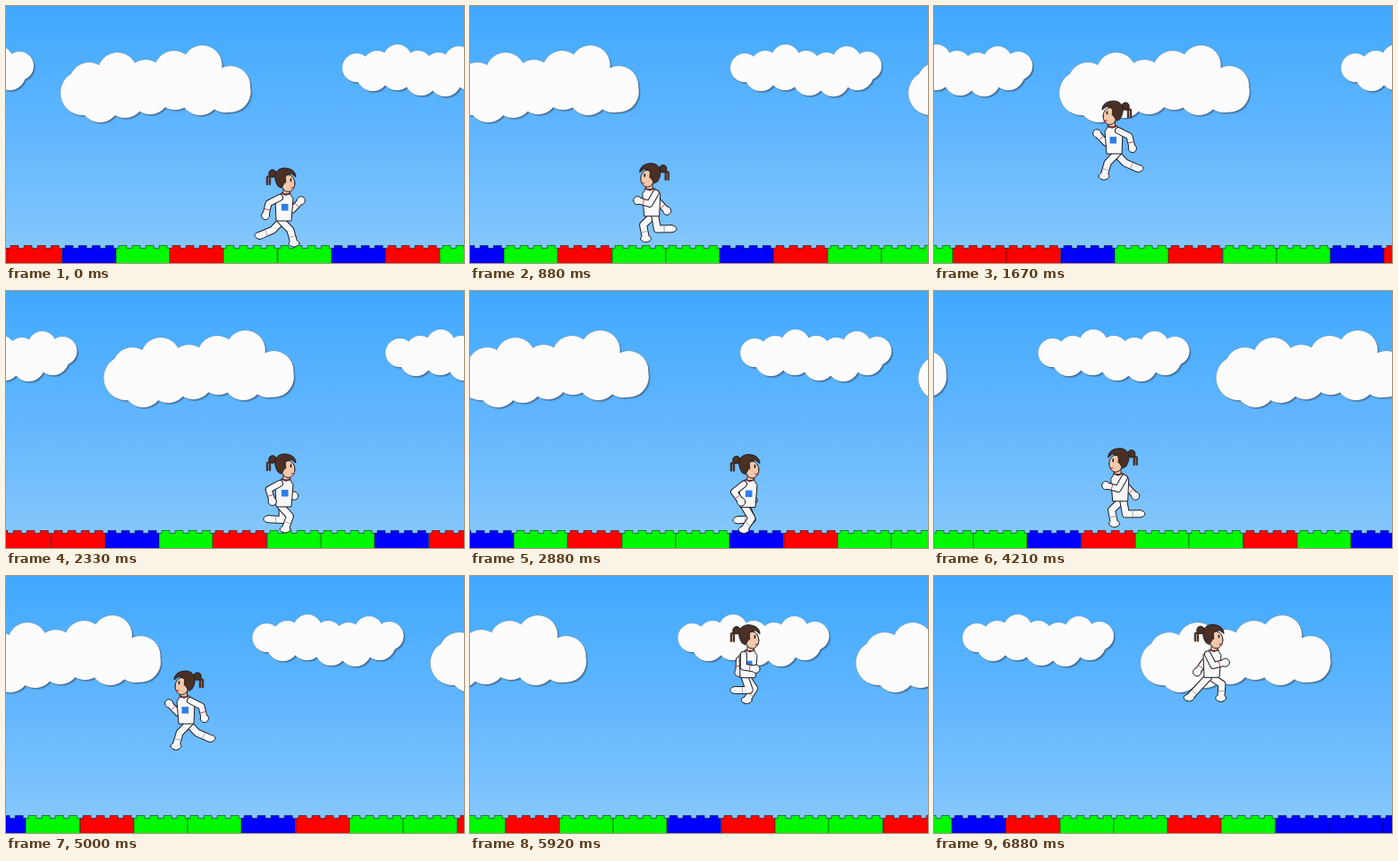
These frames come from a looping animation (512x287 px, 6.93 s). An HTML page with a canvas:

```html
<!DOCTYPE html>
<html lang="en">
<head>
<meta charset="utf-8">
<title>Runner</title>
<style>
html, body { margin: 0; width: 100%; height: 100%; overflow: hidden; background: #6cbaff; }
canvas { display: block; width: 512px; height: 287px; }
</style>
</head>
<body>
<canvas id="stage" width="512" height="287"></canvas>
<script>
const ctx = document.getElementById('stage').getContext('2d');
const W = 512, H = 287, LOOP = 6930, STEP = 1000 / 24, LAST = 165;
const INK = '#1d1d22', WHITE = '#f8f8fa', HAIR = '#4b3026', SKIN = '#f3c8ab', RED = '#c8323c';
const { sin, cos, hypot, min, max, round, PI } = Math;

// Times and speeds are in steps of 1/24 s.
const SPEED = 8.72, LEFT_STOP = 206, RIGHT_STOP = 306;
const TURNS = [9.73, 40, 90.3, 122.8];
const JUMP_PEAKS = [32.26, 112.26, 145, 168], JUMP_HALF = 11.5, JUMP_HEIGHT = 137;
const GROUND = 271, CYCLE = 40 / 3;

// The runner crosses the screen between two stops; past a stop the world scrolls instead.
function track(n) {
  let x = RIGHT_STOP, scroll = 0, dir = 1, from = 0;
  for (const turn of [...TURNS, Infinity]) {
    const end = min(turn, n);
    const goal = x + dir * SPEED * (end - from);
    x = min(RIGHT_STOP, max(LEFT_STOP, goal));
    scroll += x - goal;
    if (n <= turn) break;
    from = end;
    dir = -dir;
  }
  return { x, scroll, dir };
}

function jumpHeight(n) {
  return max(0, ...JUMP_PEAKS.map(p => JUMP_HEIGHT * (1 - ((n - p) / JUMP_HALF) ** 2)));
}

// Evenly spaced round puffs whose outer edges touch the given heights.
function row(path, x0, x1, edges, r, side) {
  edges.forEach((edge, i) => {
    puff(path, x0 + (x1 - x0) * i / (edges.length - 1), edge + side * r, r);
  });
}

function puff(path, x, y, r) {
  path.moveTo(x + r, y);
  path.arc(x, y, r, 0, PI * 2);
}

const CLOUD_GAP = 514;
const big = new Path2D(), small = new Path2D();
row(big, 93, 251, [63, 52, 60, 50, 44, 67], 22, 1);
row(big, 105, 245, [130, 125, 121, 116, 122, 119], 22, -1);
puff(big, 86, 97, 25);
puff(big, 251, 96, 22.5);
row(small, 392, 529, [53, 50, 43, 50, 52, 45, 51], 16, 1);
row(small, 410, 518, [95, 94, 100, 101, 94], 18, -1);

function cloud(path, x) {
  ctx.save();
  ctx.translate(x + 2, 2);
  for (const shade of ['rgba(35,55,85,.25)', 'rgba(35,50,75,.5)']) {
    ctx.fillStyle = shade;
    ctx.fill(path);
    ctx.translate(-1, -1);
  }
  ctx.strokeStyle = '#8097ac';
  ctx.lineWidth = 1;
  ctx.stroke(path);
  ctx.fillStyle = '#fcfcfc';
  ctx.fill(path);
  ctx.restore();
}

const BRICKS = 'GRRBGRGGBRGGRGBBB', BRICK = 60.3, FIRST = 62.5 - 3 * BRICK;
const PAINT = { R: '#fe0000', G: '#00f800', B: '#0000fe' };

function brick(x, color) {
  const gap = BRICK / 4;
  ctx.beginPath();
  ctx.moveTo(x, H + 2);
  for (let s = 0; s < 4; s++) {
    const left = x + s * gap + 3;
    ctx.lineTo(s ? left : x, 270.5);
    ctx.lineTo(left, 270.5);
    ctx.lineTo(left, 267.5);
    ctx.lineTo(left + 9, 267.5);
    ctx.lineTo(left + 9, 270.5);
  }
  ctx.lineTo(x + BRICK, 270.5);
  ctx.lineTo(x + BRICK, H + 2);
  paint(color, 'rgba(0,0,0,.45)');
}

function paint(fill, line = INK) {
  ctx.fillStyle = fill;
  ctx.fill();
  ctx.strokeStyle = line;
  ctx.lineWidth = 1;
  ctx.stroke();
}

function shape(points, fill) {
  ctx.beginPath();
  points.forEach(([x, y]) => ctx.lineTo(x, y));
  ctx.closePath();
  paint(fill);
}

function oval(x, y, rx, ry, fill) {
  ctx.beginPath();
  ctx.ellipse(x, y, rx, ry, 0, 0, PI * 2);
  paint(fill);
}

function stroke(points, color, width) {
  ctx.beginPath();
  points.forEach(([x, y]) => ctx.lineTo(x, y));
  ctx.strokeStyle = color;
  ctx.lineWidth = width;
  ctx.stroke();
}

// Middle joint of a limb with two equal bones; side 1 bends forward, -1 back.
function bend([ax, ay], [bx, by], bone, side) {
  const dx = bx - ax, dy = by - ay, d = hypot(dx, dy);
  const out = side * Math.sqrt(max(0, bone ** 2 - d * d / 4)) / d;
  return [(ax + bx) / 2 + dy * out, (ay + by) / 2 - dx * out];
}

function limb(root, end, bone, side, width, rx, ry, cuff) {
  const mid = bend(root, end, bone, side);
  stroke([root, mid, end], INK, width + 2);
  oval(end[0], end[1], rx, ry, WHITE);
  stroke([root, mid, end], WHITE, width);
  const [x, y] = [(mid[0] + end[0]) / 2, (mid[1] + end[1]) / 2];
  const d = hypot(end[0] - mid[0], end[1] - mid[1]);
  const nx = (mid[1] - end[1]) / d * 3, ny = (end[0] - mid[0]) / d * 3;
  stroke([[x - nx, y - ny], [x + nx, y + ny]], cuff, .9);
}

function handAt(a) {
  const swing = cos(a + .13);
  return [4 - 20 * swing, -35 - 17 * max(0, -swing) ** 2];
}

function footAt(a) {
  return [-3 + 20 * cos(a + .31), -4 - 9 * max(0, .25 + cos(a - 3.9))];
}

const arm = (shoulder, hand) => limb(shoulder, hand, 14, -1, 6, 4.6, 4.6, RED);
const leg = (hip, foot) => limb(hip, foot, 15.5, 1, 7, 6, 3.8, '#9a9aa2');

function head() {
  for (const x of [-14, -11]) stroke([[-8, -81], [x, -78], [x, -70]], HAIR, 2.4);
  oval(-8, -82, 4.2, 4.2, HAIR);
  shape([[4, -66], [11, -66], [11, -59], [4, -59]], SKIN);
  oval(9.5, -71, 7.5, 9.5, SKIN);
  ctx.beginPath();
  ctx.moveTo(-2, -68);
  ctx.bezierCurveTo(-9, -79, -4, -88, 5, -88);
  ctx.bezierCurveTo(13, -88, 18, -84, 18, -78);
  ctx.lineTo(13, -82);
  ctx.lineTo(7, -80);
  ctx.lineTo(5, -71);
  ctx.lineTo(2, -66);
  ctx.closePath();
  paint(HAIR);
  stroke([[6, -81], [6.5, -72]], HAIR, 1.5);
  stroke([[12.5, -76], [12.5, -73.5]], INK, 1.6);
  stroke([[13, -66], [16, -66.5]], RED, 1.2);
}

function runner(angle) {
  const hand = handAt(angle);
  arm([8, -54], handAt(angle + PI));
  leg([3, -30], footAt(angle + PI));
  leg([1, -30], footAt(angle));
  shape([[2, -60], [11, -60], [15, -54], [13, -29], [-4, -29], [-5, -54]], WHITE);
  head();
  stroke([[2, -60], [7, -58], [12, -60]], '#6b2c2c', 1.5);
  if (hand[0] < 16) {
    ctx.fillStyle = '#2f7de6';
    ctx.fillRect(2, -48, 7.5, 7.5);
  }
  arm([0, -55], hand);
}

const sky = ctx.createLinearGradient(0, 0, 0, H);
sky.addColorStop(0, '#40a9fe');
sky.addColorStop(.5, '#62b6fe');
sky.addColorStop(1, '#88c9fb');
ctx.lineCap = ctx.lineJoin = 'round';

function draw(ms) {
  const n = min(LAST, Math.floor((ms + 2) / STEP));
  const { x, scroll, dir } = track(n);
  ctx.fillStyle = sky;
  ctx.fillRect(0, 0, W, H);
  for (let k = -1; k <= 1; k++) {
    cloud(big, scroll + k * CLOUD_GAP);
    cloud(small, scroll + k * CLOUD_GAP);
  }
  [...BRICKS].forEach((c, i) => brick(round(FIRST + i * BRICK + scroll), PAINT[c]));

  const angle = n / CYCLE * 2 * PI;
  ctx.save();
  ctx.translate(x, GROUND - 2 * cos(angle) ** 2 - jumpHeight(n));
  ctx.scale(dir, 1);
  runner(angle);
  ctx.restore();
}

const start = performance.now();
function tick() {
  draw((performance.now() - start) % LOOP);
  requestAnimationFrame(tick);
}
tick();
</script>
</body>
</html>
```
